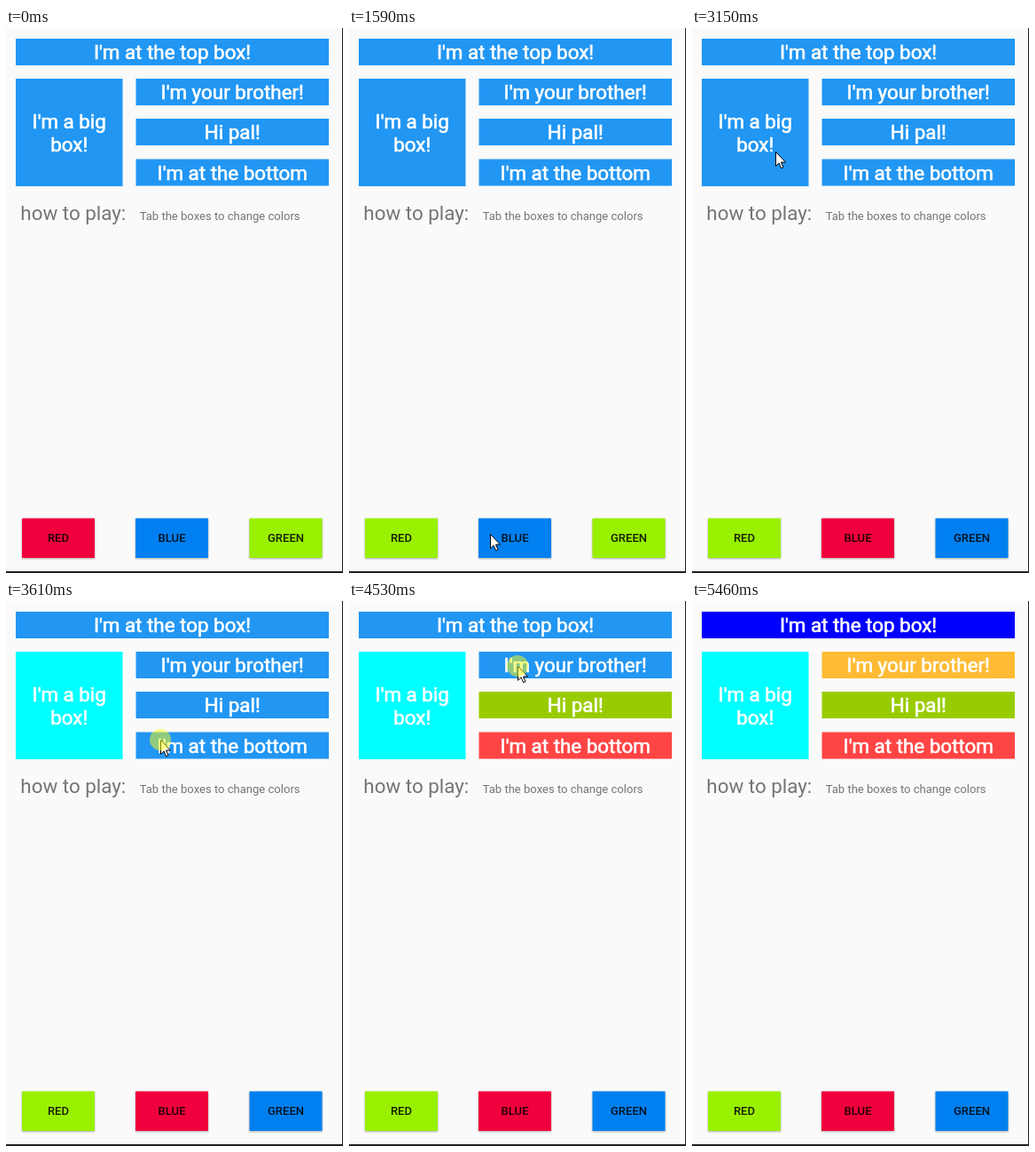
Animation, 380 px wide and 613 px high, one loop 6320 ms. Source, as an HTML page:

```html
<!DOCTYPE html>
<html lang="en">
<head>
<meta charset="utf-8">
<style>
html, body { margin: 0; width: 100%; height: 100%; overflow: hidden; background: #202024; }
svg { display: block; font-family: Roboto, "Noto Sans", sans-serif; }
.box text { font-size: 22.4px; fill: #fff; stroke: #fff; stroke-width: .65px; text-anchor: middle; }
.button text { font-size: 13.06px; font-weight: 500; fill: #000; fill-opacity: .87; text-anchor: middle; }
.button rect { filter: drop-shadow(0 1.5px 1px rgba(0, 0, 0, .33)); }
.button.down rect { filter: drop-shadow(0 3px 2px rgba(0, 0, 0, .4)); }
.hint { fill: #757575; }
</style>
</head>
<body>
<svg id="stage" width="380" height="613" viewBox="0 0 380 613">
  <rect width="379" height="611" fill="#fafafa"/>
  <text class="hint" x="16.3" y="216" font-size="22.4">how to play:</text>
  <text class="hint" x="150.7" y="216" font-size="13.06">Tab the boxes to change colors</text>
  <g id="parts"></g>
  <g id="pointer">
    <path d="M.5.5V16.3L4.1 12.9 6.6 18.7 9 17.7 6.5 12H11.5Z" fill="#fff" stroke="#000" stroke-linejoin="round"/>
    <circle id="press" r="12" fill="#ffff0d" fill-opacity=".5"/>
  </g>
</svg>
<script>
const LOOP = 6320, START = 350, LEAVE = 5450, STEP = 77.4;
const RED = '#f0003c', BLUE = '#0080f0', LIME = '#99f000', SKY = '#2196f3';

// Each part: kind, x, y, width, height, label lines, colour before and after, press and release time
const parts = [
  ['button', 18, 551.5, 82, 44.5, ['RED'], RED, LIME, 890, 1030],
  ['button', 146, 551.5, 82, 44.5, ['BLUE'], BLUE, RED, 1730, 1880],
  ['button', 274.5, 551.5, 82, 44.5, ['GREEN'], LIME, BLUE, 2420, 2580],
  ['box', 11, 57, 120.5, 121, ["I'm a big", 'box!'], SKY, '#00ffff', 3200, 3350],
  ['box', 146.5, 147.5, 217.5, 30, ["I'm at the bottom"], SKY, '#ff4444', 3600, 3750],
  ['box', 146.5, 102, 217.5, 30, ['Hi pal!'], SKY, '#99cc00', 4130, 4285],
  ['box', 146.5, 57, 217.5, 30, ["I'm your brother!"], SKY, '#ffbb33', 4520, 4675],
  ['box', 11, 12, 353, 30, ["I'm at the top box!"], SKY, '#0000ff', 5215, 5345]
].map(([kind, x, y, w, h, lines, before, after, down, up]) =>
  ({ kind, x, y, w, h, lines, before, after, down, up }));

// Pointer path: time, x, y
const path = [
  [350, 147, 581], [740, 62, 575], [1030, 62, 575], [1270, 109, 574], [1400, 109, 574],
  [1580, 159, 569], [1880, 159, 569], [2280, 328, 570], [2600, 328, 570],
  [2745, 265, 440], [2830, 210, 335], [2900, 165, 265], [3050, 55, 119],
  [3130, 94, 139], [3350, 94, 139], [3450, 174, 156], [3750, 174, 156],
  [4060, 198, 122], [4290, 198, 122], [4510, 190, 73], [4675, 190, 73],
  [4900, 189, 42], [4925, 189, 42], [5060, 188, 33], [5340, 188, 33], [5375, 252, 126], [LOOP, 252, 126]
];

const $ = id => document.getElementById(id);

function label(p, text, i) {
  const size = p.kind === 'box' ? 22.4 : 13.06;
  const base = p.y + p.h / 2 + size * .36 + (i - (p.lines.length - 1) / 2) * 26;
  return `<text x="${p.x + p.w / 2}" y="${base}">${text}</text>`;
}

$('parts').innerHTML = parts.map(p => `<g class="${p.kind}">
  <rect x="${p.x}" y="${p.y}" width="${p.w}" height="${p.h}"/>
  ${p.lines.map((text, i) => label(p, text, i)).join('')}</g>`).join('');
parts.forEach((p, i) => p.node = $('parts').children[i]);

function pointerAt(t) {
  const i = Math.max(1, path.findIndex(k => k[0] > t));
  const [t0, x0, y0] = path[i - 1], [t1, x1, y1] = path[i];
  const f = Math.max(0, (t - t0) / (t1 - t0));
  return [x0 + (x1 - x0) * f, y0 + (y1 - y0) * f];
}

function draw(now) {
  // The screen refreshes in coarse, even steps
  const t = START + Math.floor((now % LOOP - START + 8) / STEP) * STEP;
  let pressed = false;
  for (const p of parts) {
    const down = t >= p.down && t < p.up;
    pressed ||= down;
    p.node.classList.toggle('down', down);
    p.node.firstElementChild.setAttribute('fill', t < p.up ? p.before : p.after);
  }
  const [x, y] = pointerAt(t);
  $('pointer').setAttribute('transform', `translate(${Math.round(x)} ${Math.round(y)})`);
  $('pointer').setAttribute('visibility', t >= START && t < LEAVE ? 'visible' : 'hidden');
  $('press').setAttribute('display', pressed ? 'inline' : 'none');
}

const begin = performance.now();
function tick() {
  draw(performance.now() - begin);
  requestAnimationFrame(tick);
}
tick();
</script>
</body>
</html>
```
